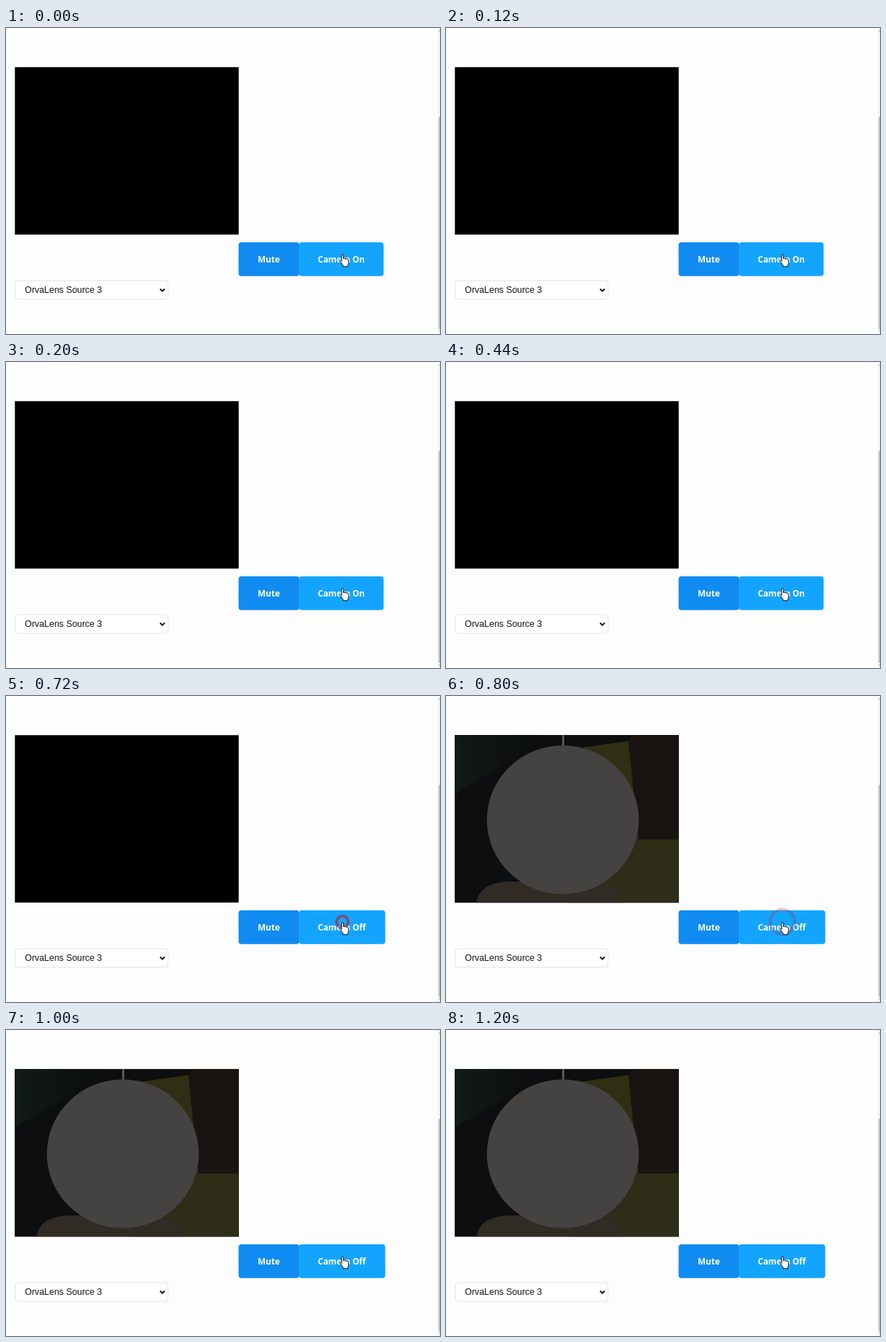
These frames come from a looping animation (600 px wide and 424 px high, 1.4 s). An HTML page:

```html
<!DOCTYPE html>
<html lang="en">
<head>
<meta charset="utf-8">
<title>Camera toggle</title>
<style>
  html, body { margin: 0; width: 100%; height: 100%; overflow: hidden; background: #fefdfe; }
  svg { display: block; }
  .label { font: 700 11.7px "Open Sans", "Noto Sans", sans-serif; fill: #fff; }
  .option { font: 12.4px "Liberation Sans", Arial, sans-serif; fill: #111; }
</style>
</head>
<body>
<svg width="600" height="424" viewBox="0 0 600 424">
  <defs>
    <linearGradient id="cloth" x1="0" y1="0" x2="0" y2="1">
      <stop offset="0" stop-color="#302f13"/>
      <stop offset="1" stop-color="#2d2d19"/>
    </linearGradient>
    <linearGradient id="shade">
      <stop offset="0" stop-color="#121a14"/>
      <stop offset="1" stop-color="#0b0d0e"/>
    </linearGradient>
    <clipPath id="screen"><rect x="12.300" y="54.300" width="309.400" height="231.900"/></clipPath>
  </defs>

  <!-- Video -->
  <g clip-path="url(#screen)">
    <path d="M12 54h310v233h-310z"/>
    <g id="photo">
      <path d="M12 54h310v233h-310z" fill="#0d0e0f"/>
      <path d="M12 54h122l-40 32-82 50z" fill="url(#shade)"/>
      <path d="M185 72l70-10 67-8v233h-150z" fill="url(#cloth)"/>
      <path d="M252 62l6-8h64v145h-56z" fill="#191412"/>
      <path d="M42 287q3-27 42-30h132q24 8 28 30z" fill="#302b25"/>
      <path d="M162 54v16" stroke="#66665f" stroke-width="2.500"/>
      <ellipse cx="161.500" cy="171.500" rx="105" ry="103" fill="#454341"/>
    </g>
  </g>

  <!-- Buttons -->
  <rect x="321.500" y="297" width="84" height="46.800" rx="4" fill="#108bf1"/>
  <rect id="toggle" x="405" y="297" height="46.800" rx="4" fill="#13a4ff"/>
  <text class="label" x="348" y="325">Mute</text>
  <text class="label" id="state" x="431" y="325"></text>

  <!-- Source list -->
  <rect x="12.500" y="350" width="211.500" height="26" rx="4" fill="#fff" stroke="#e2e3ea"/>
  <text class="option" x="26" y="367">OrvaLens Source 3</text>
  <path d="M213 361.500l3.200 3.200 3.200-3.200" fill="none" stroke="#111" stroke-width="1.800"/>

  <!-- Scrollbar -->
  <path d="M597 0h3v424h-3z" fill="#f3f2f3"/>
  <path d="M598 123h2v294h-2z" fill="#c3c2c3"/>
  <path d="M599 5l1-2v2zM599 419h1v2z" fill="#777"/>

  <!-- Click ring and pointer -->
  <circle id="ring" cx="465" cy="313" fill="none" stroke="#a03048" stroke-width="4"/>
  <path d="M464 323.500V315a1.300 1.300 0 0 1 2.600 0v5c0-1.200 2.400-1.200 2.400.2c0-1 2.300-.9 2.300.5c0-.9 2.200-.7 2.200.8v4q0 2-1 3.200v2h-6.500v-2l-4.200-5.300c-1-1.600.7-2.600 2.200-.2z"
        fill="#fff" stroke="#111" stroke-linejoin="round"/>
</svg>
<script>
  const LOOP = 1400, STEP = 200, CLICK = 600;
  const [photo, toggle, state, ring] =
    ["photo", "toggle", "state", "ring"].map(id => document.getElementById(id));

  function draw(now) {
    const time = Math.floor(now % LOOP / STEP) * STEP;
    const sinceClick = time - CLICK;
    const on = sinceClick >= 0;
    state.textContent = on ? "Camera Off" : "Camera On";
    toggle.setAttribute("width", on ? 119.3 : 117);
    photo.style.display = sinceClick >= STEP ? "" : "none";

    // The ring grows and fades in two steps.
    const grow = sinceClick / STEP;
    ring.style.display = on && grow < 2 ? "" : "none";
    ring.setAttribute("r", 8 + 9 * Math.max(0, grow));
    ring.setAttribute("stroke-opacity", 0.7 - 0.4 * grow);
  }

  function tick() {
    draw(performance.now());
    requestAnimationFrame(tick);
  }
  tick();
</script>
</body>
</html>
```
